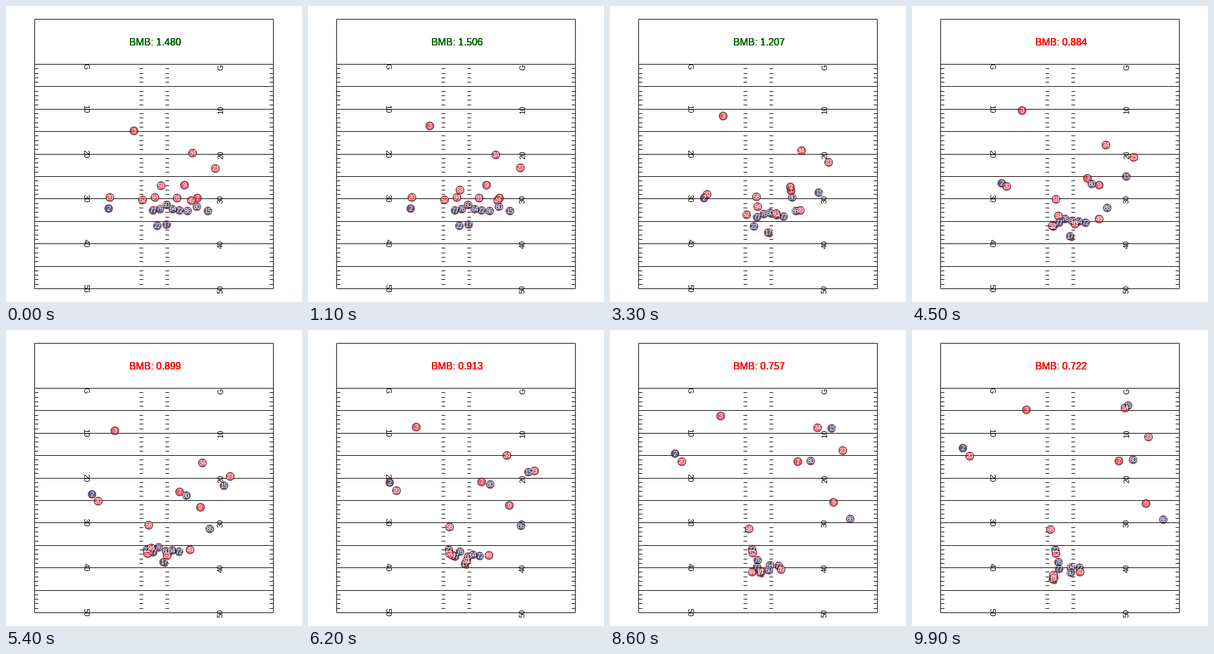
A matplotlib script for the animation above (10 s loop, 480x480 px).

```python
import matplotlib.pyplot as plt
import numpy as np
from matplotlib.animation import FuncAnimation
from matplotlib.colors import to_rgba

SIZE, DPI, FRAMES = 480, 100, 100
LEFT, RIGHT, TOP, GOAL, MID = 46, 433, 21, 94, 458
YARD = (MID - GOAL) / 50
SNAP, LAST = 12, FRAMES - 1
DEFENSE = ("#e31837", "black")
OFFENSE = ("#002244", "#c60c30")
BROWN = "#654321"
T = np.arange(FRAMES)


def px(n):
    return n * 72 / DPI


def ease(start, end):
    s = np.clip((T - start) / (end - start), 0, 1)
    return s * s * (3 - 2 * s)


def blend(a, b, s):
    """Move from point a to point b as s goes from 0 to 1."""
    return np.add(a, np.outer(s, np.subtract(b, a)))


fig = plt.figure(figsize=(SIZE / DPI, SIZE / DPI), dpi=DPI, facecolor="white")
ax = fig.add_axes([0, 0, 1, 1])
ax.set_xlim(0, SIZE)
ax.set_ylim(SIZE, 0)
ax.axis("off")


def line(x0, y0, x1, y1):
    ax.plot([x0, x1], [y0, y1], color="black", lw=px(1), zorder=1,
            snap=True, solid_capstyle="butt")


def label(x, y, text, size, angle=0, **kw):
    return ax.text(x, y, text, fontsize=px(size), family="Liberation Sans",
                   rotation=angle, rotation_mode="anchor",
                   ha="center", va="baseline", **kw)


def disc(diameter, fill, edge, z):
    return ax.plot([], [], "o", ms=px(diameter), mew=px(1), zorder=z,
                   mfc=to_rgba(fill, 0.7), mec=to_rgba(edge, 0.7),
                   antialiased=False)[0]


def draw_field():
    for x in (LEFT, RIGHT):
        line(x, TOP, x, MID)
    line(LEFT, TOP, RIGHT, TOP)
    for yard in range(51):
        y = round(GOAL + yard * YARD)
        if yard % 5 == 0:
            line(LEFT, y, RIGHT, y)
        else:
            for x in (LEFT, 216, 258, RIGHT - 6):
                line(x, y, x + 6, y)
        if yard % 10 == 0:
            text, drop = (str(yard), 0) if yard else ("G", 4)
            label(125.5, y + drop, text, 12, 270, zorder=2)
            label(352, y + drop + 1, text, 12, 90, zorder=2)


players = {}


def add(number, team, path):
    tag = label(0, 0, str(number), 11, color="white", zorder=5)
    players[number] = (disc(13, *team, 3), tag, path)


def route(number, team, *points):
    """Run a smooth curve through points evenly spaced in time."""
    start = SNAP if team is OFFENSE else 0
    s = np.clip((T - start) / (LAST - start), 0, 1)
    n = len(points)
    fits = np.polyfit(np.linspace(0, 1, n), points, n - 1).T
    add(number, team, np.column_stack([np.polyval(f, s) for f in fits]))


def chase(number, other, gap, final, until):
    """Shadow another player while the gap closes to its final value."""
    add(number, DEFENSE,
        players[other][2] + blend(gap, final, ease(SNAP, until)))


draw_field()

# blockers: the pocket drops back, then leans to one side
drop = ease(8, LAST)
blockers = [(77, 0, 56), (76, -12, 47), (60, -3, 71), (64, -13, 56), (72, -10, 54)]
for k, (number, lean, depth) in enumerate(blockers, -2):
    x = 259.5 + 10.8 * k + lean * drop ** 3
    y = 322 + 6.5 * abs(k) ** 0.5 + depth * drop
    add(number, OFFENSE, np.column_stack([x, y]))

# backs and receivers
route(17, OFFENSE, (260, 354), (256, 371), (252, 383), (228, 404))
route(22, OFFENSE, (245, 356), (230, 357), (228, 355), (232, 356))
route(2, OFFENSE, (166, 328), (147, 296), (125, 229), (82, 191))
route(80, OFFENSE, (309, 325), (292, 296), (301, 234), (358, 210))
route(86, OFFENSE, (294, 332), (310, 329), (360, 312), (407, 307))

# zone defenders
route(3, DEFENSE, (207, 202), (177, 166), (185, 129))
route(23, DEFENSE, (339, 263), (361, 241), (383, 173))
route(58, DEFENSE, (251, 291), (232, 315), (224, 323))
route(34, DEFENSE, (302, 238), (316, 220), (345, 126))
route(49, DEFENSE, (300, 315), (308, 331), (290, 370), (272, 392))

route(15, OFFENSE, (327, 332), (344, 285), (360, 207), (350, 122))

# rushers and cover men
chase(7, 80, (1, -14), (-23, 2), LAST)
chase(94, 77, (3, -21), (-9, 10), LAST)
chase(91, 17, (17, -43), (2, -2), 72)
chase(9, 86, (-5, -42), (-28, -26), LAST)
chase(20, 2, (2, -18), (11, 13), 62)
chase(52, 22, (-24, -42), (1, 6), 55)

# the ball flies from the center to the passer and stays with him
flight = np.clip((T - 17) / 9, 0, 1)[:, None]
ball_path = players[60][2] * (1 - flight) + (players[17][2] + (3, 4)) * flight
ball = disc(7, BROWN, BROWN, 4)

score = np.interp(T, [0, 21, 45, 62, 74, 86, 99],
                  [1.48, 1.53, 0.884, 0.913, 0.604, 0.757, 0.722])
# overprinted so the strokes come out crisp and heavy
titles = [label(241.5, 64.5, "", 16, zorder=6) for _ in range(6)]


def draw(i):
    for dot, tag, path in players.values():
        x, y = path[i]
        dot.set_data([x], [y])
        tag.set_position((x + 0.5, y + 4))
    ball.set_data(ball_path[i, :1], ball_path[i, 1:])
    for title in titles:
        title.set_text(f"BMB: {score[i]:.3f}")
        title.set_color("darkgreen" if score[i] >= 1 else "red")
    return []


anim = FuncAnimation(fig, draw, frames=FRAMES, interval=100,
                     init_func=lambda: draw(0), repeat=True, repeat_delay=0)
plt.show()
```
